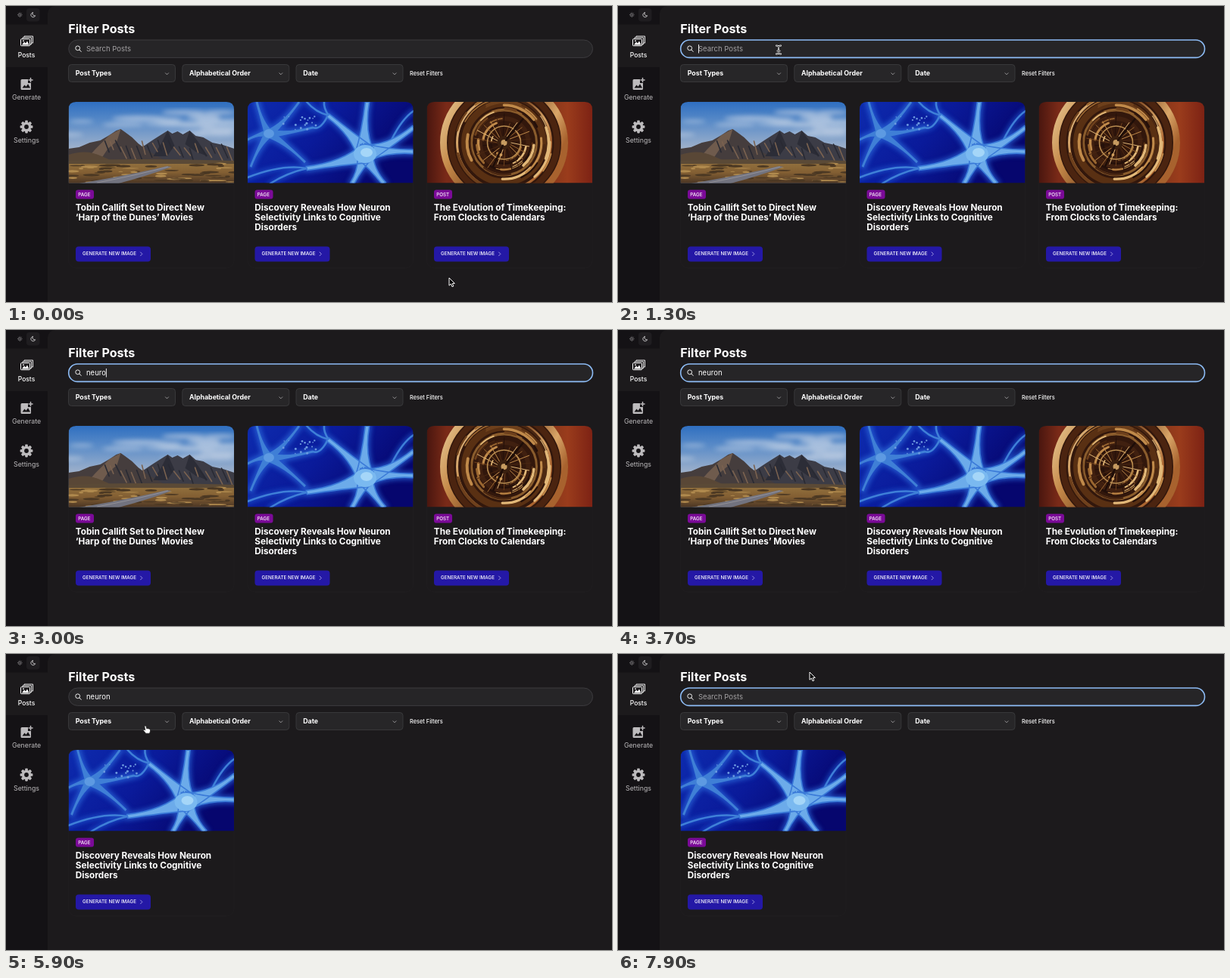
These frames come from a looping animation (800 px wide and 392 px high, 8000 ms). An HTML page:

```html
<!DOCTYPE html>
<html lang="en">
<head>
<meta charset="utf-8">
<title>Filter Posts</title>
<style>
html, body { margin: 0; width: 100%; height: 100%; overflow: hidden; background: #1c1a1c; }
svg { display: block; width: 800px; height: 392px; }
text { font-family: Inter, "Open Sans", sans-serif; fill: #fff; }
.h1 { font-size: 16.1px; font-weight: 700; }
.title { font-size: 11.75px; font-weight: 700; }
.field { font-size: 9.5px; }
.select { font-size: 8.8px; font-weight: 700; }
.reset { font-size: 7.4px; font-weight: 500; }
.button, .badge { font-size: 6.25px; font-weight: 500; }
.nav { font-size: 8.8px; text-anchor: middle; fill: #bdbbbd; }
.nav.on { fill: #fff; font-weight: 500; font-size: 8.5px; }
.line { fill: none; stroke-linecap: round; stroke-linejoin: round; }
</style>
</head>
<body>
<svg id="stage" viewBox="0 0 800 392"></svg>
<script>
const LOOP = 8000, TICK = 100;
const IMG_W = 218.5, IMG_H = 107.5;
const COLS = [82.5, 319, 555.5];

const rect = (x, y, w, h, r, attrs) =>
  `<rect x="${x}" y="${y}" width="${w}" height="${h}" rx="${r}" ${attrs}/>`;
const text = (x, y, cls, str) => `<text x="${x}" y="${y}" class="${cls}">${str}</text>`;
const line = (d, color, w) => `<path class="line" d="${d}" stroke="${color}" stroke-width="${w}"/>`;
const fill = (d, color) => `<path d="${d}" fill="${color}"/>`;
const blob = (x, y, rx, ry, color) =>
  `<ellipse cx="${x}" cy="${y}" rx="${rx}" ry="${ry}" fill="${color}"/>`;

let seed = 7;
const rnd = () => (seed = seed * 16807 % 2147483647) / 2147483647;
const many = (n, make) => Array.from({ length: n }, (_, i) => make(i)).join("");

function mountains() {
  const clouds = many(22, () =>
    blob(rnd() * 219, 12 + rnd() * 34, 12 + rnd() * 26, 1.5 + rnd() * 3, "#c9d5e6"));
  const scrub = many(60, () => {
    const y = 82 + rnd() * 25;
    return blob(rnd() * 219, y, 3 + rnd() * 9, .5 + rnd() * 1.2, rnd() < .5 ? "#b08a4e" : "#4b3823");
  });
  const gullies = many(24, i => {
    const x = 48 + i * 7, y = 50 + rnd() * 12;
    return line(`M${x} ${y}l${4 + rnd() * 5} ${10 + rnd() * 10}`, i % 2 ? "#7a6250" : "#292a33", 1.6);
  });
  return rect(0, 0, IMG_W, IMG_H, 0, 'fill="url(#sky)"') +
    `<g filter="url(#soft3)" opacity=".7">${clouds}</g><g filter="url(#soft1)">` +
    fill("M84 64L100 58L112 50L123 43L131 38L137 42L144 39L151 43L160 38L168 45L178 47L190 54L204 57L219 62V86H80Z", "#3c3c46") +
    fill("M0 62L14 60L28 54L42 51L54 44L63 38L69 36L76 41L84 47L92 55L104 64L118 72L134 82H0Z", "#453d3d") +
    fill("M131 38L122 56L112 72H130L140 58ZM160 38L154 56L168 66L184 72L172 54Z", "#2c2d37") +
    fill("M54 44L69 36L64 52L52 62L40 80H20L36 62Z", "#6f5b4d") +
    gullies + fill("M0 70Q24 62 44 72T80 80H0Z", "#594736") +
    rect(0, 79, IMG_W, 29, 0, 'fill="url(#plain)"') +
    fill("M0 78Q80 74 219 78V82H0Z", "#5b4a36") + scrub +
    fill("M14 108Q80 97 130 85L136 86Q104 98 66 108Z", "#72737f") +
    line("M38 107Q90 97 131 86", "#aaa7a9", .6) + "</g>";
}

// A limb that narrows from a cell body to its tip; bend is the sideways bow.
function limb(x, y, tx, ty, bend, w, tip) {
  const dx = tx - x, dy = ty - y, len = Math.hypot(dx, dy), nx = -dy / len, ny = dx / len;
  const mx = x + dx * .4 + nx * bend, my = y + dy * .4 + ny * bend, m = tip * .6;
  return `M${x + nx * w} ${y + ny * w}Q${mx + nx * m} ${my + ny * m} ${tx + nx * tip} ${ty + ny * tip}` +
    `L${tx - nx * tip} ${ty - ny * tip}Q${mx - nx * m} ${my - ny * m} ${x - nx * w} ${y - ny * w}Z`;
}

function neurons() {
  const cell = [[106, 18, 6], [158, 0, -4], [219, 34, 8], [219, 66, -3], [180, 108, 4], [138, 108, -3], [78, 88, -6]]
    .map(([x, y, bend]) => limb(155, 68, x, y, bend, 13, 2.6)).join("");
  const far = [[68, 0, 5], [12, 0, -3], [0, 50, 4], [86, 34, 4], [76, 80, -4], [4, 86, 4]]
    .map(([x, y, bend]) => limb(28, 42, x, y, bend, 6, 1.5)).join("");
  const fibres = ["M107 18Q100 8 101 0", "M107 18Q90 14 78 0", "M78 88Q52 94 30 108", "M78 88Q46 82 0 100",
    "M190 50Q204 22 219 12", "M86 34Q96 38 106 18"];
  const strands = (color, w) => fibres.map(d => line(d, color, w)).join("");
  const dots = many(18, () =>
    `<circle cx="${46 + rnd() * 52}" cy="${14 + rnd() * 26}" r="${.6 + rnd()}" fill="#6d9be0"/>`);
  return rect(0, 0, IMG_W, IMG_H, 0, 'fill="url(#deep)"') +
    `<g filter="url(#soft3)" opacity=".75">${strands("#1f52cc", 7)}` +
    `<path d="${cell + far}" fill="#2a66d8" stroke="#2a66d8" stroke-width="6"/></g>` +
    `<g filter="url(#soft1)">${strands("#3f80d8", 2.6)}${fill(far, "#3f7fd6")}${blob(28, 42, 7, 6, "#5d9ae2")}` +
    `<path d="${cell}" fill="#6cabea" stroke="#3a7ad8" stroke-width="1.6"/>` +
    blob(155, 69, 15, 12, "#7ab9f0") + blob(157, 67, 8, 6, "#a5d6f8") + "</g>" + dots;
}

function clockwork() {
  const cx = 102, cy = 54;
  const ring = (r, color, w) =>
    `<circle cx="${cx}" cy="${cy}" r="${r}" fill="none" stroke="${color}" stroke-width="${w}"/>`;
  const at = (r, a) => `${cx + r * Math.cos(a)} ${cy + r * Math.sin(a)}`;
  const tones = ["#e2b878", "#9a6630", "#c08a4a", "#4a2712", "#24100a", "#6e401c"];
  const arcs = many(52, i => {
    const r = 14 + rnd() * 50, a = rnd() * 6.28, b = a + .3 + rnd() * .9;
    return line(`M${at(r, a)}A${r} ${r} 0 0 1 ${at(r, b)}`, tones[i % tones.length], 1 + rnd() * 3);
  });
  const spokes = many(22, i => {
    const a = i * Math.PI / 11, r = 24 + rnd() * 16;
    return line(`M${at(9, a)}L${at(r, a + .15)}`, tones[i % tones.length], 1);
  });
  return rect(0, 0, IMG_W, IMG_H, 0, 'fill="url(#copper)"') +
    `<g filter="url(#soft1)">${blob(cx, cy, 84, 84, "#32170c")}` +
    ring(80, "url(#rim)", 9) + ring(70, "#4b2410", 8) + ring(62, "url(#rim)", 3) +
    ring(52, "#593013", 9) + ring(43, "#8a5c2c", 3) + ring(32, "#402010", 6) + arcs + spokes +
    ring(22, "#b98c50", 1.6) + blob(cx, cy, 9, 9, "#3a2010") + blob(cx, cy, 4, 4, "#c69b60") +
    line(`M${at(4, -.9)}L${at(40, -.9)}M${at(4, 2)}L${at(34, 2)}`, "#1d0d08", 2.4) + "</g>";
}

const chevronDown = (x, y) => line(`M${x - 2} ${y - 1}l2 2l2 -2`, "#c8c6c8", .7);

function card(i, art, kind, lines) {
  return `<g id="card${i}" transform="translate(${COLS[i]} 127)">` +
    rect(0, 0, IMG_W, 220, 10, 'fill="#1c1a1c" stroke="#211f21" stroke-width=".8"') +
    `<g clip-path="url(#photo)">${art}</g>` +
    rect(9.5, 116.5, 24, 12, 3, 'fill="#7b0a98"') + text(12.8, 124.8, "badge", kind) +
    lines.map((s, n) => text(9.3, 143.5 + n * 13.4, "title", s)).join("") +
    rect(9.5, 191.5, 99, 20, 4, 'fill="#2418a6"') + text(18.6, 203.4, "button", "GENERATE NEW IMAGE") +
    line("M95 199l2.4 2.4l-2.4 2.4", "#b9b4ee", .8) + "</g>";
}

function gear(cx, cy) {
  const teeth = many(8, i =>
    rect(cx - 1.8, cy - 8.4, 3.6, 5, .8, `transform="rotate(${i * 45} ${cx} ${cy})"`));
  return `<g fill="#bdbbbd">${teeth}</g><circle cx="${cx}" cy="${cy}" r="4.6" fill="none" stroke="#bdbbbd" stroke-width="3.4"/>`;
}

function sidebar() {
  const rays = many(8, i =>
    `<path d="M18.3 8.4v1" stroke="#a09ea0" stroke-width=".7" transform="rotate(${i * 45} 18.3 11.7)"/>`);
  return rect(0, 0, 70, 392, 0, 'fill="#141215"') + rect(55, 0, 760, 410, 10, 'fill="#1c1a1c"') +
    rect(0, 24.5, 55.5, 56.5, 0, 'fill="#1c1a1c"') +
    rect(27, 3, 17.5, 17.5, 4, 'fill="#1f1d20"') +
    `<circle cx="18.3" cy="11.7" r="1.5" fill="none" stroke="#a09ea0" stroke-width=".8"/>` + rays +
    line("M35.2 8.8A3 3 0 1 0 38.6 12.8A2.9 2.9 0 0 1 35.2 8.8Z", "#e8e6e8", .8) +
    line("M24 41v-1h11.5v9h-1.2M22 43v-1.2h11.5v9h-1.2", "#fff", .9) +
    rect(19.5, 43.7, 12, 9, .8, 'fill="none" stroke="#fff" stroke-width="1"') +
    fill("M21 51.5l3-4l2 2l2-3l2.6 5Z", "#fff") + `<circle cx="23" cy="46.2" r=".9" fill="#fff"/>` +
    text(27, 68, "nav on", "Posts") +
    fill("M21 97h8v5h4v7.5q0 1.5-1.5 1.5h-10.5q-1.5 0-1.5-1.5v-11q0-1.5 1.5-1.5Z", "#bdbbbd") +
    fill("M21.5 108.5l3-4l2 2.3l2.6-3.5l3 5.2Z", "#141215") +
    line("M32.5 95.5v5M30 98h5", "#bdbbbd", 1.5) +
    text(27, 124.4, "nav", "Generate") + gear(27, 160) + text(27, 181, "nav", "Settings");
}

const SELECTS = [["Post Types", 82.5], ["Alphabetical Order", 232.8], ["Date", 383]];
const selects = SELECTS.map(([label, x]) =>
  rect(x, 77.5, 141, 23, 4, 'fill="#272628" stroke="#3c3b3e" stroke-width=".9"') +
  text(x + 9.2, 92, "select", label) + chevronDown(x + 130, 89.8)).join("");

const stops = list => list.map(([o, c]) => `<stop offset="${o}" stop-color="${c}"/>`).join("");
const defs = `<defs>
  <linearGradient id="sky" x2="0" y2="1">${stops([[0, "#2f6fc0"], [.25, "#5b8cc8"], [.6, "#a4b4cb"]])}</linearGradient>
  <linearGradient id="plain" x2="0" y2="1">${stops([[0, "#94733f"], [.5, "#835f33"], [1, "#4a3524"]])}</linearGradient>
  <linearGradient id="deep" y2=".4">${stops([[0, "#0d2bae"], [.5, "#0a1a9a"], [1, "#06066e"]])}</linearGradient>
  <linearGradient id="copper">${stops([[0, "#4a160f"], [.12, "#7a2a18"], [.5, "#5a2b14"], [.85, "#9a3c1c"], [1, "#7d2214"]])}</linearGradient>
  <linearGradient id="rim" y2=".5">${stops([[0, "#f0d6a4"], [.3, "#c58a4a"], [.6, "#7a431d"], [.85, "#d9a668"], [1, "#a8622e"]])}</linearGradient>
  <filter id="soft1"><feGaussianBlur stdDeviation=".7"/></filter>
  <filter id="soft3"><feGaussianBlur stdDeviation="3"/></filter>
  <clipPath id="photo"><path d="M0 ${IMG_H}V10Q0 0 10 0H${IMG_W - 10}Q${IMG_W} 0 ${IMG_W} 10V${IMG_H}Z"/></clipPath>
</defs>`;

const pointers = `<g id="pointer">
  <path id="arrow" d="M0 0V10.2L2.4 8L4 11.8L5.8 11L4.2 7.4H7.3Z" fill="#000" stroke="#fff" stroke-width="1"/>
  <g id="beam" class="line">
    <path d="M-3 -5.5Q0 -5.5 0 -3.5Q0 -5.5 3 -5.5M0 -4V4M-3 5.5Q0 5.5 0 3.5Q0 5.5 3 5.5M-1.5 1.5H1.5" stroke="#fff" stroke-width="2"/>
    <path d="M-2.8 -5.5Q0 -5.5 0 -3.5Q0 -5.5 2.8 -5.5M0 -4V4M-2.8 5.5Q0 5.5 0 3.5Q0 5.5 2.8 5.5M-1.5 1.5H1.5" stroke="#222" stroke-width=".7"/>
  </g>
  <path id="hand" d="M-1.2 .6Q0 -.8 1 .6L1.7 3.8Q2.8 3 3.5 4Q4.5 3.3 5.2 4.4Q6.5 4.2 6.6 5.8L6.2 8.4L5.3 10.2H.6Q-1.2 8 -2.7 6.3Q-2.9 4.8 -1.2 5.3L-.3 6Z" fill="#fff" stroke="#111" stroke-width=".7"/>
</g>`;

const $ = id => document.getElementById(id);
$("stage").innerHTML = defs + sidebar() +
  text(82.3, 36, "h1", "Filter Posts") +
  rect(82.7, 45, 691.8, 23.4, 11.7, 'id="box" fill="#262527"') +
  `<circle cx="94.7" cy="55.8" r="2.9" fill="none" stroke="#fff" stroke-width=".9"/>` +
  line("M97 58.2l2.2 2.2", "#fff", 1) +
  `<text id="query" x="106" y="60" class="field"></text>` +
  rect(106, 51, .9, 11.5, 0, 'id="caret" fill="#fff"') +
  selects + text(533, 91.5, "reset", "Reset Filters") +
  card(0, mountains(), "PAGE", ["Tobin Callift Set to Direct New", "‘Harp of the Dunes’ Movies"]) +
  card(1, neurons(), "PAGE", ["Discovery Reveals How Neuron", "Selectivity Links to Cognitive", "Disorders"]) +
  card(2, clockwork(), "POST", ["The Evolution of Timekeeping:", "From Clocks to Calendars"]) +
  pointers;

// time, x, y of the pointer's hot spot
const PATH = [
  [0, 585, 360], [100, 585, 360], [600, 210, 49], [900, 208, 56], [1300, 212, 58], [2000, 230, 66],
  [4000, 230, 66], [4500, 432, 24], [4800, 432, 24], [5400, 240, 92], [5900, 184, 95],
  [6100, 176, 84], [6400, 160, 58], [7200, 160, 58], [7600, 240, 30], [7900, 253, 24]
];
const TYPED = [[0, 0], [2400, 1], [2500, 2], [2700, 3], [2800, 4], [3000, 5], [3100, 6],
  [6700, 5], [6800, 4], [6900, 3], [7000, 2], [7100, 1], [7200, 0]];
const FOCUS = [[1000, 4800], [6400, LOOP]];
const CARET = [[1000, 1500], [2000, 3600], [4000, 4400], [6400, 7700]];
const AWAY = [[2400, 4000], [6700, 7200]];
const FILTER_AT = 4800;

const during = (spans, t) => spans.some(([a, b]) => t >= a && t < b);
const inside = (x, y, l, top, w, h) => x >= l && x <= l + w && y >= top && y <= top + h;
const show = (id, on) => $(id).setAttribute("display", on ? "inline" : "none");

function pointerAt(t) {
  const i = PATH.findLastIndex(p => t >= p[0]);
  const a = PATH[i], b = PATH[i + 1] || a;
  const u = b === a ? 0 : (t - a[0]) / (b[0] - a[0]);
  const k = u * u * (3 - 2 * u);
  return [a[1] + (b[1] - a[1]) * k, a[2] + (b[2] - a[2]) * k];
}

function drawPointer(t, filtered) {
  const [x, y] = pointerAt(t);
  const beam = inside(x, y, 82, 45, 693, 24);
  const links = [...SELECTS.map(s => [s[1], 77, 141, 24]),
    ...COLS.slice(0, filtered ? 1 : 3).map(c => [c + 9, 318, 99, 20])];
  const hand = links.some(r => inside(x, y, ...r));
  $("pointer").setAttribute("transform", `translate(${x} ${y})`);
  show("pointer", !during(AWAY, t));
  show("beam", beam);
  show("hand", hand);
  show("arrow", !beam && !hand);
}

function draw(t) {
  const focused = during(FOCUS, t), filtered = t >= FILTER_AT;
  const value = "neuron".slice(0, TYPED.findLast(s => t >= s[0])[1]);
  const query = $("query"), box = $("box");
  query.textContent = value || "Search Posts";
  query.style.fill = value ? "#fff" : "#a3a1a3";
  box.setAttribute("stroke", focused ? "#8dbcf5" : "#403f42");
  box.setAttribute("stroke-width", focused ? 1.6 : .9);
  show("caret", during(CARET, t));
  $("caret").setAttribute("x", 106 + (value ? query.getComputedTextLength() : 0));
  show("card0", !filtered);
  show("card2", !filtered);
  $("card1").setAttribute("transform", `translate(${COLS[filtered ? 0 : 1]} 127)`);
  drawPointer(t, filtered);
}

const start = performance.now();
function tick() {
  const t = (performance.now() - start) % LOOP;
  draw(Math.floor(t / TICK) * TICK);
  requestAnimationFrame(tick);
}
tick();
</script>
</body>
</html>
```
